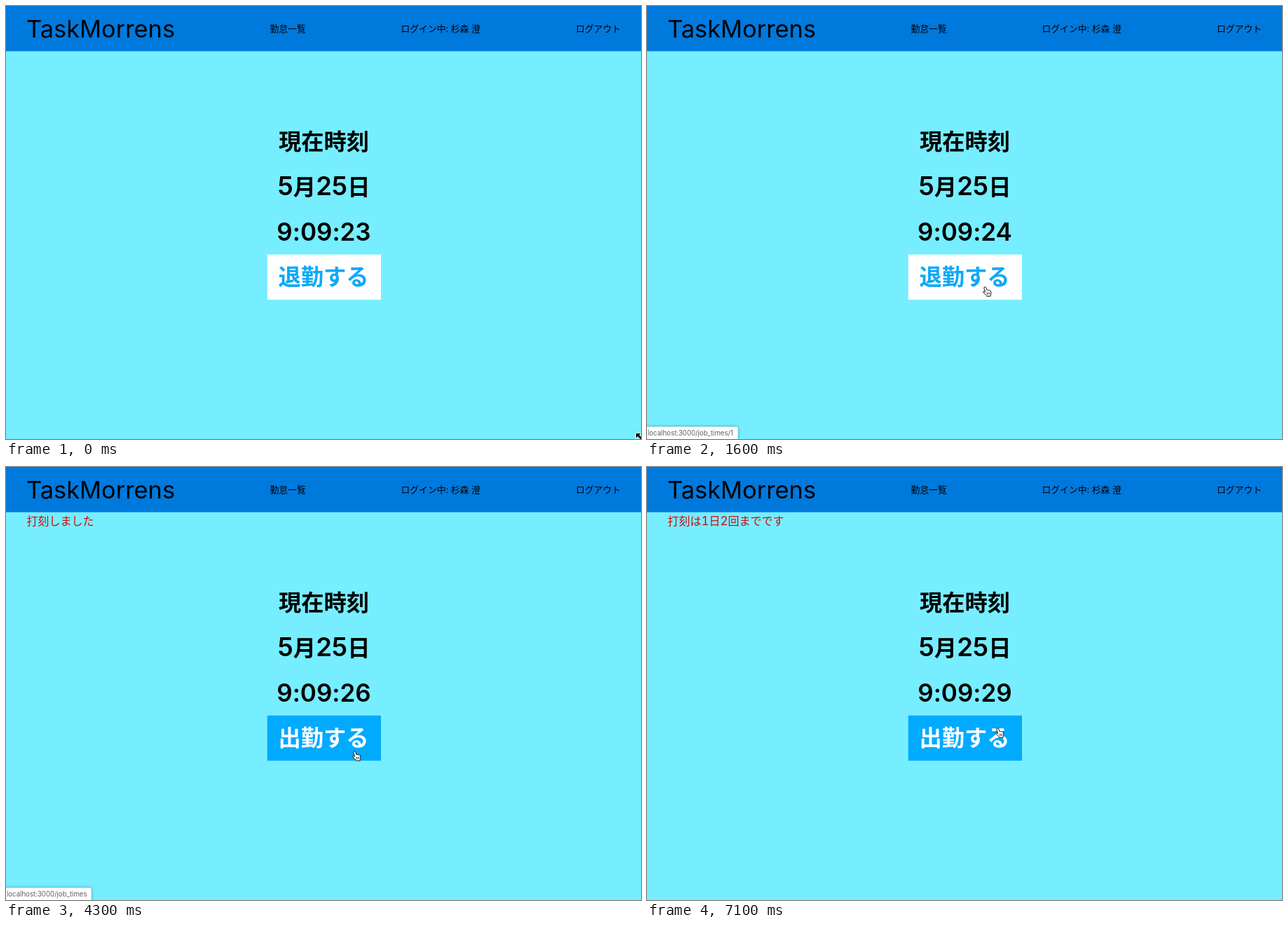
Write an HTML page that moves like this. It is 906 px wide and 618 px high and loops after 7200 ms.

```html
<!DOCTYPE html>
<html lang="ja">
<head>
<meta charset="utf-8">
<title>Time clock</title>
<style>
  html, body { margin: 0; width: 100%; height: 100%; overflow: hidden; background: #76eeff; }
  svg { display: block; width: 906px; height: 618px; }
  text { font-family: Inter, "Noto Sans CJK JP", "Noto Sans CJK", sans-serif; white-space: pre; font-feature-settings: "calt" 0; }
  .nav { font-size: 12.8px; }
  .big { font-size: 32.3px; font-weight: 700; text-anchor: middle; }
  .num { font-size: 36.5px; font-weight: 600; }
  #clock { font-size: 35px; }
  .note { font-size: 16px; fill: #d4060c; }
  .note .num { font-size: 17px; font-weight: 400; font-feature-settings: "tnum"; }
  #status text { font-size: 9.65px; fill: #5c5f62; }
  #status rect { filter: drop-shadow(0 0 2px rgba(0, 40, 60, .45)); }
</style>
</head>
<body>
<svg viewBox="0 0 906 618">
  <rect width="906" height="618" fill="#76eeff"/>
  <rect width="906" height="64.5" fill="#0079dd"/>
  <text x="29" y="45" font-size="34.4">TaskMorrens</text>
  <g class="nav">
    <text x="376.5" y="37">勤怠一覧</text>
    <text x="563.5" y="37">ログイン中: 杉森 澄</text>
    <text x="813" y="37">ログアウト</text>
  </g>

  <text id="saved" class="note" x="29.5" y="83">打刻しました</text>
  <text id="limit" class="note" x="29.5" y="83">打刻は<tspan class="num">1</tspan>日<tspan class="num">2</tspan>回までです</text>

  <text class="big" x="453.5" y="205.2">現在時刻</text>
  <text class="big" x="453.5" y="270.3"><tspan class="num">5</tspan>月<tspan class="num">25</tspan>日</text>
  <text id="clock" class="big num" x="453.5" y="334.8"></text>
  <rect id="button" x="372.8" y="354.7" width="162.2" height="64.5"/>
  <text id="label" class="big" x="453" y="398.2"></text>

  <g id="status">
    <rect x="-6" y="600.5" height="24" rx="3" fill="#fff"/>
    <text x="1" y="612.5"></text>
  </g>

  <path id="resize" d="M899 610h6.5l-2.2 2.2 6 6-2 2-6-6-2.3 2.3z" fill="#000" stroke="#fff" stroke-width="1.6" stroke-linejoin="round" paint-order="stroke"/>
  <path id="arrow" d="M0 0v13l3-2.8 2 4.6 2.2-1-2-4.4h4.2z" fill="#000" stroke="#fff" stroke-width="1" stroke-linejoin="round"/>
  <g id="hand" stroke="#111" stroke-linejoin="round" stroke-linecap="round">
    <path fill="#fff" stroke-width="1" d="M3.2 1.1C4 .5 5 .9 5.3 1.8L6.5 5.6c.6-.7 1.5-.5 1.9.2.6-.6 1.4-.4 1.8.3.7-.4 1.5 0 1.7.9l.5 2.9c.2 1.4-.5 2.1-.8 3.1v1.2H6.2c-.1-1.2-1.5-1.9-2.4-3.1L1.2 8.7c-.7-1 .5-2 1.5-1.2l1.4 1L2.4 2.9c-.2-.8.2-1.4.8-1.8z"/>
    <path fill="none" stroke-width=".7" d="M6.5 9.4l.3 2.4M8.2 9.2l.3 2.4M9.9 9l.3 2.4"/>
  </g>
</svg>
<script>
const LOOP = 7200, STEP = 100;
const OUT = 1900, DENIED = 5200;   // page reloads

const el = id => document.getElementById(id);
const show = (id, on) => el(id).style.display = on ? '' : 'none';
const clamp = v => Math.min(1, Math.max(0, v));
const ramp = (t, a, b) => clamp((t - a) / (b - a));
const ease = p => p * p * (3 - 2 * p);

const ticks = [1100, OUT + 1000, OUT + 2000, OUT + 3000, DENIED, DENIED + 1000];

// pointer stops: time, x, y
const stops = [
  [0, 902, 614], [900, 485, 407], [1900, 485, 407], [2200, 495, 408],
  [2600, 500, 412], [6500, 500, 412], [7000, 503, 379], [LOOP, 503, 379]
];

function pointer(t) {
  const i = stops.findIndex(s => s[0] > t);
  const [t0, x0, y0] = stops[i - 1], [t1, x1, y1] = stops[i];
  const p = ease(ramp(t, t0, t1));
  return [x0 + (x1 - x0) * p, y0 + (y1 - y0) * p];
}

function drawStatus(t) {
  const opacity = ramp(t, 1000, 1400) * (1 - ramp(t, 5300, 5700));
  const moved = t >= OUT + 100;
  const [box, text] = el('status').children;
  el('status').setAttribute('opacity', opacity);
  box.setAttribute('width', moved ? 127.8 : 135.8);
  text.textContent = 'localhost:3000/job_times' + (moved ? '' : '/1');
}

function drawPointer(t) {
  const [x, y] = pointer(t);
  const over = x < 535 && x > 373 && y > 355 && y < 419;
  show('resize', t < STEP);
  show('arrow', t >= STEP && !over);
  show('hand', over);
  el('arrow').setAttribute('transform', `translate(${x - 3} ${y - 6})`);
  el('hand').setAttribute('transform', `translate(${x - 6.5} ${y - 7})`);
}

function draw(t) {
  const left = t >= OUT;
  el('clock').textContent = '9:09:' + (23 + ticks.filter(s => s <= t).length);
  show('saved', left && t < DENIED);
  show('limit', t >= DENIED);
  el('button').setAttribute('fill', left ? '#00aaff' : '#fff');
  el('label').setAttribute('fill', left ? '#fff' : '#0ca9f8');
  el('label').textContent = left ? '出勤する' : '退勤する';
  drawStatus(t);
  drawPointer(t);
}

const start = performance.now();
function frame() {
  const t = (performance.now() - start) % LOOP;
  draw(Math.floor(t / STEP) * STEP);
  requestAnimationFrame(frame);
}
frame();
</script>
</body>
</html>
```
